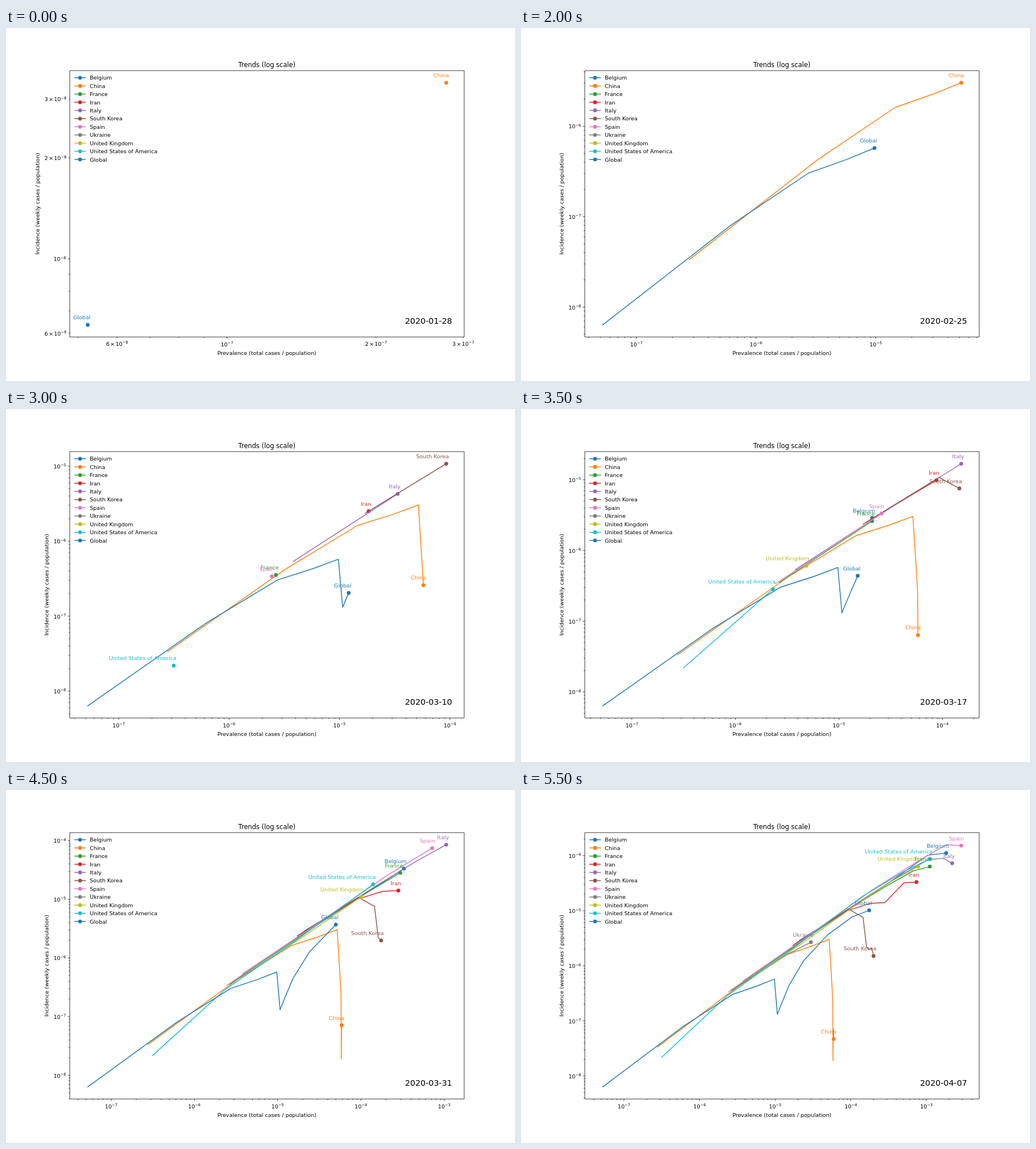
Write an HTML page that moves like this. It is 899 px wide and 623 px high and loops after 7500 ms.

```html
<!DOCTYPE html>
<html lang="en">
<head>
<meta charset="utf-8">
<title>Trends (log scale)</title>
<style>
  html, body { margin: 0; width: 100%; height: 100%; overflow: hidden; background: #fff; }
  svg { display: block; width: 899px; height: 623px; font: 9.56px "DejaVu Sans", sans-serif; }
  .step { visibility: hidden; }
  .step.on { visibility: visible; }
  .curve { fill: none; stroke-width: 1.44; stroke-linejoin: round; stroke-linecap: square; }
  .axis { fill: none; stroke: #000; stroke-width: .77; }
  .mid { text-anchor: middle; }
  .end { text-anchor: end; }
  .sup { font-size: 6.7px; }
  .title { font-size: 11.5px; }
  .date { font-size: 14.35px; }
</style>
</head>
<body>
<svg id="chart" viewBox="0 0 899 623"></svg>
<script>
const LEFT = 112.7, RIGHT = 809.2, TOP = 75.2, BOTTOM = 545.3;
const STEP = 500, LOOP = 7500, STEPS = 12;

// name, colour, first step, population, weekly case totals (led by the week before)
const series = [
  ['Belgium', '#1f77b4', 7, 11.4e6, [8, 239, 1085, 3743, 11899, 20814]],
  ['China', '#ff7f0e', 0, 1.393e9, [59, 386, 4520, 20330, 42600, 72200, 77700, 80220, 80840,
    81025, 81720, 82417, 82877]],
  ['France', '#2ca02c', 6, 67e6, [12, 178, 1402, 6633, 19856, 44550, 74390]],
  ['Iran', '#d62728', 6, 81.8e6, [61, 1501, 7161, 14991, 23049, 41495, 60500]],
  ['Italy', '#9467bd', 5, 60.4e6, [3, 229, 2036, 9172, 27980, 63927, 101739, 132547]],
  ['South Korea', '#8c564b', 5, 51.6e6, [31, 885, 4785, 7513, 8320, 9037, 9786, 10331]],
  ['Spain', '#e377c2', 6, 46.7e6, [3, 114, 1204, 9191, 33500, 85195, 135032]],
  ['Ukraine', '#7f7f7f', 10, 44.6e6, [74, 484, 1325]],
  ['United Kingdom', '#bcbd22', 7, 66.5e6, [39, 323, 1547, 6654, 22200, 51800]],
  ['United States of America', '#17becf', 6, 327e6, [53, 103, 754, 4661, 45800, 163199, 363321]],
  ['Global', '#1f77b4', 0, 7.6e9, [60, 398, 4659, 20771, 43650, 74250, 81240, 92110, 115500,
    182400, 379200, 789000, 1331500]]
].map(([name, color, first, pop, cases]) => ({
  name, color, first,
  // prevalence and mean daily incidence, both as log10
  points: cases.slice(1).map((c, i) =>
    [Math.log10(c / pop), Math.log10((c - cases[i]) / 7 / pop)])
}));

const text = (x, y, str, cls = '', extra = '') =>
  `<text x="${x}" y="${y}" class="${cls}" ${extra}>${str}</text>`;
const dot = (x, y, color) => `<circle cx="${x}" cy="${y}" r="3.36" fill="${color}"/>`;
const curve = (d, color) => `<path class="curve" stroke="${color}" d="${d}"/>`;

// Maps log values to pixels, leaving a 5% margin around the data
function makeScale(values, from, to) {
  const lo = Math.min(...values), hi = Math.max(...values), pad = (hi - lo) * .05;
  const min = lo - pad, max = hi + pad;
  const at = v => from + (v - min) / (max - min) * (to - from);
  return { min, max, at };
}

function power(mult, exp) {
  const lead = mult > 1 ? `${mult}<tspan dx="1.3">×</tspan><tspan dx="1.3">10</tspan>` : '10';
  return `${lead}<tspan class="sup" dy="-3.6">−${-exp}</tspan>`;
}

function ticks(scale, vertical) {
  const wide = scale.max - scale.min > 1;
  let path = '', labels = '';
  for (let exp = Math.floor(scale.min); exp <= scale.max; exp++) {
    for (let mult = 1; mult < 10; mult++) {
      const v = exp + Math.log10(mult);
      if (v < scale.min || v > scale.max) continue;
      const p = scale.at(v), major = mult === 1, len = major ? 3.36 : 1.92;
      path += vertical ? `M${LEFT} ${p}h${-len}` : `M${p} ${BOTTOM}v${len}`;
      if (!major && (wide || ![2, 3, 4, 6].includes(mult))) continue;
      labels += vertical
        ? text(major ? 106 : 106.8, p + 4, power(mult, exp), 'end')
        : text(p, major ? 562 : 560.6, power(mult, exp), 'mid');
    }
  }
  return `<path class="axis" d="${path}"/>` + labels;
}

function drawStep(k) {
  const shown = series.filter(s => s.first <= k)
    .map(s => ({ ...s, points: s.points.slice(0, k - s.first + 1) }));
  const all = shown.flatMap(s => s.points);
  const sx = makeScale(all.map(p => p[0]), LEFT, RIGHT);
  const sy = makeScale(all.map(p => p[1]), BOTTOM, TOP);
  let lines = '', names = '';
  for (const { name, color, points } of shown) {
    const px = points.map(([x, y]) => [sx.at(x), sy.at(y)]);
    const [x, y] = px[px.length - 1];
    if (px.length > 1) lines += curve('M' + px.join('L'), color);
    lines += dot(x, y, color);
    names += text(x + 4.8, y - 9.6, name, 'end', `fill="${color}"`);
  }
  const day = new Date(Date.UTC(2020, 0, 28 + 7 * Math.min(k, 10))).toISOString().slice(0, 10);
  const labelX = k ? 75 : 59;
  return `<g class="step">${lines}${ticks(sx, false)}${ticks(sy, true)}${names}`
    + text(labelX, 310.2, 'Incidence (weekly cases / population)', 'mid',
      `transform="rotate(-90 ${labelX} 310.2)"`)
    + text(788, 522, day, 'end date') + '</g>';
}

const legend = series.map(({ name, color }, i) => {
  const y = 87.8 + 14.42 * i;
  return curve(`M121.2 ${y}h19.2`, color) + dot(130.8, y, color) + text(148, y + 3.5, name);
}).join('');

const chart = document.getElementById('chart');
chart.innerHTML = Array.from({ length: STEPS }, (_, k) => drawStep(k)).join('') + legend
  + `<path class="axis" d="M${LEFT} ${TOP}H${RIGHT}V${BOTTOM}H${LEFT}Z"/>`
  + text(460.8, 69, 'Trends (log scale)', 'mid title')
  + text(460.8, 577, 'Prevalence (total cases / population)', 'mid');

const steps = chart.querySelectorAll('.step');
let current = -1;
function tick() {
  const k = Math.min(STEPS - 1, Math.floor(performance.now() % LOOP / STEP));
  if (k !== current) {
    steps.forEach((g, i) => g.classList.toggle('on', i === k));
    current = k;
  }
  requestAnimationFrame(tick);
}
tick();
</script>
</body>
</html>
```
